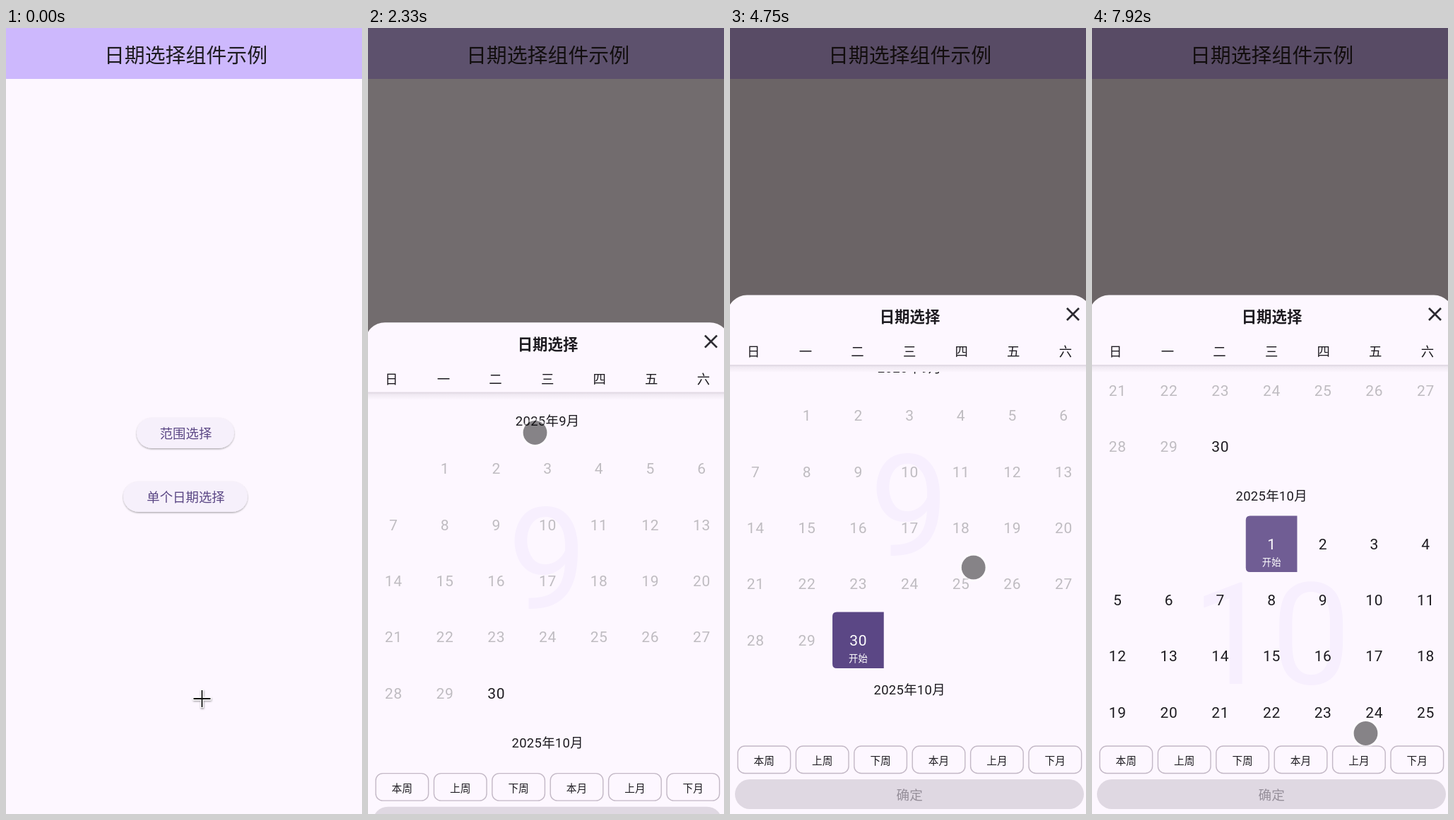
Animation, 504 px wide and 1111 px high, one loop 8 s. Source, as an HTML page:

```html
<!DOCTYPE html>
<html lang="zh-CN">
<head>
<meta charset="utf-8">
<title>日期选择组件示例</title>
<style>
  html, body { margin: 0; width: 100%; height: 100%; overflow: hidden; background: #fdf7ff; }
  svg { display: block; width: 100vw; height: 100vh; }
  text { font-family: Roboto, "Noto Sans CJK SC", "Noto Sans CJK", sans-serif; text-anchor: middle; fill: #1d1b20; }
</style>
</head>
<body>
<svg viewBox="0 0 504 1111" preserveAspectRatio="none">
  <defs>
    <clipPath id="listClip"><rect y="486" width="504" height="500"/></clipPath>
    <clipPath id="pillClip"><rect x="185" y="551" width="138" height="43" rx="21.5"/></clipPath>
    <linearGradient id="headShadow" x2="0" y2="1">
      <stop offset="0" stop-color="#5a4a60" stop-opacity=".2"/>
      <stop offset=".3" stop-color="#5a4a60" stop-opacity=".08"/>
      <stop offset="1" stop-color="#5a4a60" stop-opacity="0"/>
    </linearGradient>
    <filter id="pillShadow" x="-10%" y="-20%" width="120%" height="150%">
      <feDropShadow dx="0" dy="1.3" stdDeviation="0.9" flood-color="#000" flood-opacity=".33"/>
    </filter>
    <filter id="crossShadow" x="-50%" y="-50%" width="200%" height="200%">
      <feDropShadow dx="0.5" dy="1.5" stdDeviation="1.2" flood-color="#000" flood-opacity=".4"/>
    </filter>
  </defs>
  <rect width="504" height="1111" fill="#fdf7ff"/>
  <rect width="504" height="72" fill="#cdb8fd"/>
  <g id="page"></g>
  <g clip-path="url(#pillClip)" fill="#5b4785">
    <rect id="tint" x="185" y="551" width="138" height="43"/>
    <circle id="wave" cx="239" cy="572" opacity=".1"/>
  </g>
  <g id="pageText"></g>
  <rect id="scrim" width="504" height="1111" fill="#0a0400"/>
  <g id="sheet">
    <rect x="-4" y="377.5" width="516" height="780" rx="28" fill="#fdf7ff"/>
    <rect y="476" width="504" height="11" fill="url(#headShadow)"/>
    <path d="M477 396l17 17m0-17l-17 17" stroke="#2b2930" stroke-width="2.7"/>
    <g clip-path="url(#listClip)"><g id="list"></g></g>
    <rect id="thumb" x="499" width="10" height="74" rx="3" fill="#dedae1"/>
    <g id="foot"></g>
  </g>
  <g id="dot">
    <circle r="17" fill-opacity=".47"/>
    <circle r="18.6" fill="none" stroke="#fff" stroke-opacity=".38" stroke-width="3.2"/>
  </g>
  <g id="cross">
    <path d="M-13 0H13M0-13V13" stroke="#fff" stroke-width="4.5" filter="url(#crossShadow)"/>
    <path d="M-12 0H12M0-12V12" stroke="#111" stroke-width="1.8"/>
  </g>
</svg>
<script>
const $ = id => document.getElementById(id);
const PURPLE = '#5b4785', DARK = '#1d1b20', GREY = '#bfbcc1';
const LOOP = 8000, FPS = 12;
const COL = 72.7, ROW = 79.4, SCROLL = 309.8;

const set = (el, attrs) => { for (const k in attrs) el.setAttribute(k, attrs[k]); };
const ramp = (t, from, to) => Math.min(1, Math.max(0, (t - from) / (to - from)));
const easeOut = (t, from, to, power = 2) => 1 - (1 - ramp(t, from, to)) ** power;

function add(parent, tag, attrs) {
  const el = document.createElementNS('http://www.w3.org/2000/svg', tag);
  set(el, attrs);
  return parent.appendChild(el);
}

// y is the visual middle of the text
function label(parent, str, x, y, size, color = DARK, attrs = {}) {
  const drop = /^\d+$/.test(str) ? 0.3555 : 0.38;
  const el = add(parent, 'text', { x, y: y + size * drop, 'font-size': size, ...attrs });
  el.style.fill = color;
  el.textContent = str;
  return el;
}

// Start page
label($('page'), '日期选择组件示例', 254.5, 38, 28.9);
['范围选择', '单个日期选择'].forEach((str, i) => {
  const width = str.length * 18.9 + 62.5, y = 551 + i * 90;
  add($('page'), 'rect', { x: 254 - width / 2, y, width, height: 43, rx: 21.5, fill: '#f6f0fb', filter: 'url(#pillShadow)' });
  label($('pageText'), str, 254.5, y + 22, 18.4, PURPLE);
});

// Sheet header
label($('sheet'), '日期选择', 254.5, 408, 21.4, DARK, { 'font-weight': 700 });
[...'日一二三四五六'].forEach((d, i) => label($('sheet'), d, 33.3 + i * 73.6, 457, 18.4));

// Months
function month(num, titleY, firstCol, days, firstOpen) {
  const list = $('list'), top = titleY + 68;
  label(list, `2025年${num}月`, 254.2, titleY, 18.4, DARK, { 'letter-spacing': 0.33 });
  label(list, String(num), 254, top + 127, 200, '#f7effe');
  return Array.from({ length: days }, (_, i) => {
    const n = i + firstCol, x = 36 + (n % 7) * COL, y = top + Math.floor(n / 7) * ROW;
    const box = add(list, 'path', { fill: PURPLE });
    const text = label(list, String(i + 1), x + 0.3, y, 21, i + 1 < firstOpen ? GREY : DARK, { 'letter-spacing': 0.66 });
    const note = label(list, '', x + 0.2, y + 25.7, 13.3, '#fff', { 'letter-spacing': 0.3 });
    return { x, y, box, text, note };
  });
}
const sep30 = month(9, 516, 1, 30, 30)[29];
const oct1 = month(10, 971, 3, 31, 1)[0];

function boxPath(x, y, right) {
  const left = 6, w = COL - left - right, h = ROW - 2 * left, hr = ROW - 2 * right;
  return `M${x - COL / 2 + left} ${y - ROW / 2}h${w}q${right} 0 ${right} ${right}v${hr}q0 ${right} ${-right} ${right}`
    + `h${-w}q${-left} 0 ${-left} ${-left}v${-h}q0 ${-left} ${left} ${-left}z`;
}

function select({ x, y, box, text, note }, alpha, ended) {
  set(box, { d: boxPath(x, y, ended ? 6 : 0), opacity: alpha });
  text.style.fill = alpha ? '#fff' : DARK;
  note.textContent = !alpha ? '' : ended ? '开始/结束' : '开始';
}

// Footer
const foot = $('foot');
['本周', '上周', '下周', '本月', '上月', '下月'].forEach((str, i) => {
  const x = 11 + i * 82.4;
  add(foot, 'rect', { x, y: 1015, width: 74.6, height: 38.5, rx: 10, fill: 'none', stroke: '#c3b8c6', 'stroke-width': 1.4 });
  label(foot, str, x + 37.3, 1035.5, 14.7);
});
function confirmButton(fill, color) {
  const g = add(foot, 'g', {});
  add(g, 'rect', { x: 7, y: 1062, width: 494, height: 42, rx: 21, fill });
  label(g, '确定', 254.2, 1084, 18.6, color);
  return g;
}
confirmButton('#dfd8e2', '#968f9a');
const active = confirmButton(PURPLE, '#fff');

// Pointer moves: start, end, x, y
const moves = [
  [0, 80, 279, 936],
  [170, 330, 250, 491],
  [500, 670, 246, 560],
  [920, 1000, 248, 586],
  [1670, 1830, 236.5, 572],
  [2590, 2920, 291, 1068],
  [2920, 3080, 208, 964],
  [3080, 3750, 181.5, 904.5],
  [4170, 4500, 331, 892],
  [4681, 5000, 366.5, 556.5],
  [5420, 5750, 197, 572],
  [6590, 7000, 268, 886],
  [7000, 7250, 252, 738],
  [7670, 7920, 387.5, 997]
];

function pointer(t) {
  let x = 277.5, y = 948;
  for (const [from, to, toX, toY] of moves) {
    const p = easeOut(t, from, to);
    x += (toX - x) * p;
    y += (toY - y) * p;
  }
  return `translate(${x} ${y})`;
}

function draw(ms) {
  // hold the picture for each 1/12 s, with times rounded to 10 ms
  const t = Math.round(Math.floor((ms + 3.4) * FPS / 1000) * 100 / FPS) * 10;

  const touching = t >= 1830, place = pointer(t);
  set($('cross'), { transform: place, visibility: touching ? 'hidden' : 'visible' });
  set($('dot'), { transform: place, visibility: touching ? 'visible' : 'hidden' });

  set($('tint'), { opacity: 0.12 * ramp(t, 1950, 2080) });
  set($('wave'), { r: 32 * ramp(t, 1960, 2170) });

  const open = easeOut(t, 2180, 2420, 3);
  set($('scrim'), { opacity: 0.6 * open });
  set($('sheet'), { transform: `translate(0 ${(1 - open) * 733})` });

  const offset = SCROLL * easeOut(t, 4723, 5170);
  set($('list'), { transform: `translate(0 ${-offset})` });
  set($('thumb'), { y: 486 + offset * 0.149, opacity: ramp(t, 4750, 5000) - ramp(t, 5940, 6200) });

  const moved = t > 7720;
  select(sep30, moved ? 0 : ramp(t, 4200, 4470), t > 6220);
  select(oct1, ramp(t, 7720, 7950), false);
  set(active, { opacity: ramp(t, 6200, 6420) - ramp(t, 7720, 7900) });
}

const start = performance.now();
(function tick() {
  draw((performance.now() - start) % LOOP);
  requestAnimationFrame(tick);
})();
</script>
</body>
</html>
```
